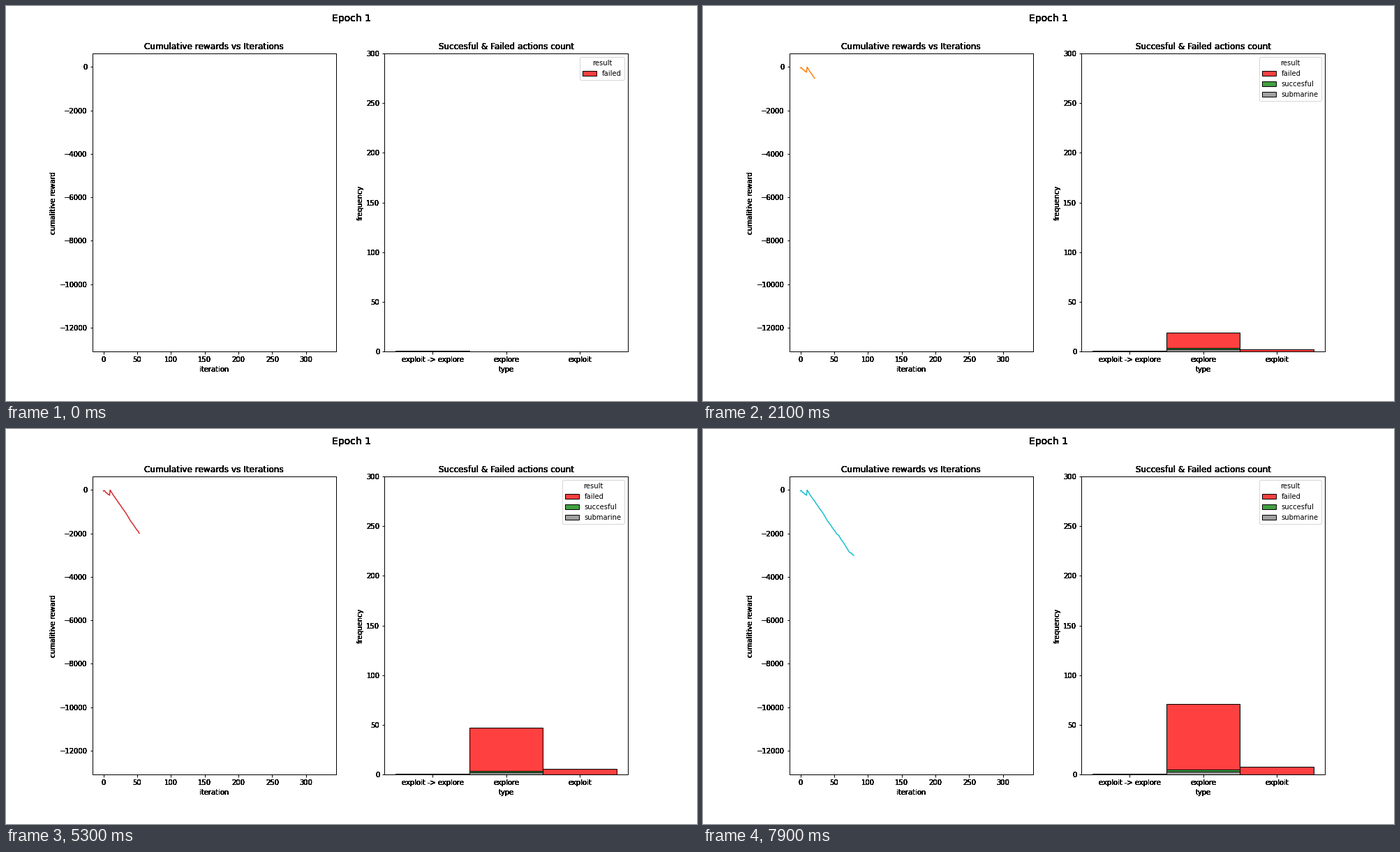
A matplotlib script that plays this animation: 990x566 px, repeating every 8000 ms.

```python
import numpy as np
import matplotlib.pyplot as plt
from matplotlib.animation import FuncAnimation
from matplotlib.patches import Patch, Rectangle

W, H, DPI = 990, 566, 72
FRAMES, INTERVAL = 80, 100

plt.rcParams.update({
    "font.family": "DejaVu Sans", "font.size": 10,
    "axes.linewidth": 1, "xtick.major.width": 1, "ytick.major.width": 1,
})

# Cumulative reward at its turning points
KNOTS = [(0, -50), (1, -20), (4, -130), (5, -140), (7, -205), (8, -210),
         (9, -245), (10, -5), (14, -212), (20, -475), (24, -660), (25, -690),
         (28, -840), (33, -1050), (35, -1150), (40, -1418), (43, -1540),
         (50, -1860), (51, -1880), (53, -1997), (55, -2050), (57, -2100),
         (60, -2270), (62, -2350), (65, -2480), (70, -2740), (73, -2880),
         (76, -2910), (77, -2980), (79, -3009)]
STEPS = np.arange(FRAMES)
REWARD = np.interp(STEPS, *zip(*KNOTS))

# One action per step: its type and its result
TYPES = ["exploit -> explore", "explore", "exploit"]
RESULTS = {"failed": (1, 0, 0, .75), "succesful": (0, .5, 0, .75),
           "submarine": (.5, .5, .5, .75)}
EXPLOIT = [2, 11, 25, 26, 27, 28, 72, 76]
SUCCESS, SUBMARINE = [1, 10], [5, 8, 74]

kind = np.ones(FRAMES, int)
kind[0] = 0
kind[EXPLOIT] = 2
result = np.zeros(FRAMES, int)
result[SUCCESS] = 1
result[SUBMARINE] = 2


def overprint(text, times=8):
    """Draw a text several times so its soft edges turn solid."""
    draw = text.draw

    def repeat(renderer):
        for _ in range(times):
            draw(renderer)

    text.draw = repeat


def label(ax, title, xlabel, ylabel):
    ax.set_title(title, fontsize=12)
    ax.set_xlabel(xlabel)
    ax.set_ylabel(ylabel)
    texts = [ax.title, ax.xaxis.label, ax.yaxis.label]
    for axis in (ax.xaxis, ax.yaxis):
        texts += [tick.label1 for tick in axis.get_major_ticks()]
    for text in texts:
        overprint(text)


fig, (left, right) = plt.subplots(
    1, 2, figsize=((W + 1e-6) / DPI, (H + 1e-6) / DPI), dpi=DPI)
fig.subplots_adjust(left=.125, right=.9, bottom=.125, top=.88, wspace=.2)
overprint(fig.suptitle("Epoch 1", fontsize=14))

left.set_xticks(range(0, 301, 50))
left.set_yticks(range(-12000, 1, 2000))
left.set_xlim(-16.4, 344.4)
left.set_ylim(-13105, 624)
label(left, "Cumulative rewards vs Iterations", "iteration", "cumalitive reward")
line, = left.plot([], [], lw=1.5)

right.set_xticks(range(3), TYPES)
right.set_yticks(range(0, 301, 50))
right.set_xlim(-.65, 2.65)
right.set_ylim(0, 300)
label(right, "Succesful & Failed actions count", "type", "frequency")

bars = {}
for k in range(3):
    for r, color in enumerate(RESULTS.values()):
        bars[k, r] = right.add_patch(
            Rectangle((k - .5, 0), 1, 0, fc=color, ec="black", lw=1))
handles = [Patch(fc=color, ec="black", lw=1, label=name)
           for name, color in RESULTS.items()]


def update(n):
    line.set_data(STEPS[:n + 1], REWARD[:n + 1])
    line.set_color(f"C{n % 10}")
    line.set_visible(n > 0)

    done_kind, done_result = kind[:n + 1], result[:n + 1]
    for k in range(3):
        base = 0
        for r in (2, 1, 0):
            count = int(np.sum((done_kind == k) & (done_result == r)))
            bars[k, r].set(y=base, height=count, visible=count > 0)
            base += count

    seen = [handles[r] for r in range(3) if r in done_result]
    right.legend(handles=seen, title="result", loc="upper right")
    return []


anim = FuncAnimation(fig, update, frames=FRAMES, interval=INTERVAL,
                     init_func=lambda: update(0), repeat=True, repeat_delay=0)
plt.show()
```
